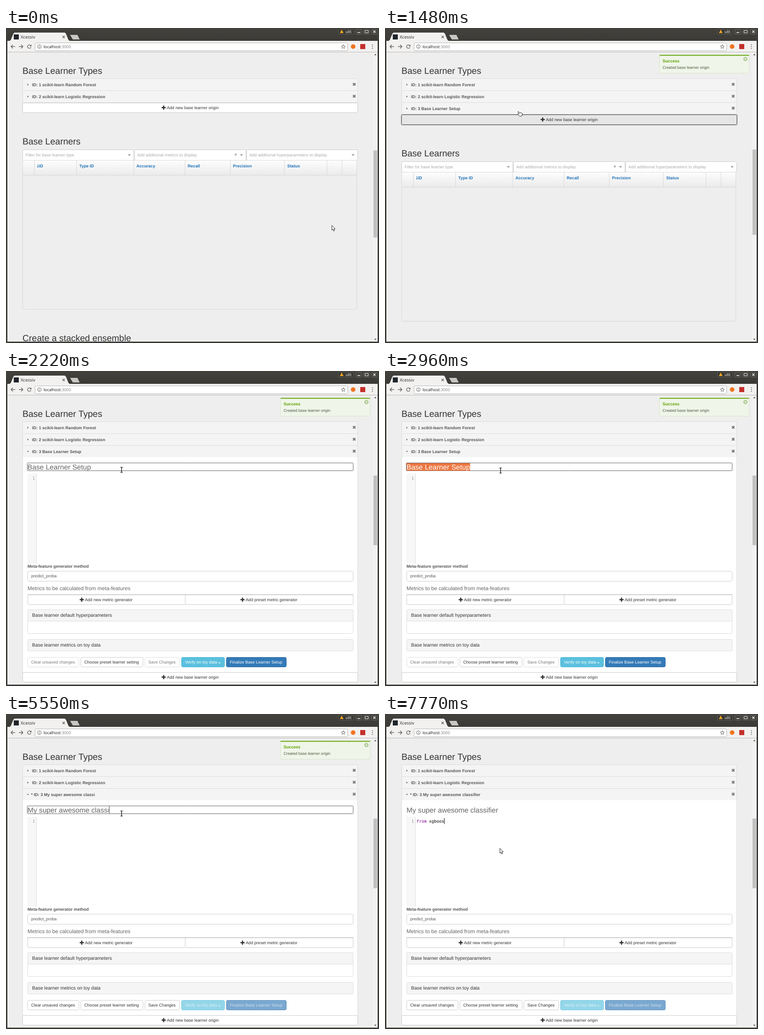
An HTML page with a canvas that plays this animation: 815x687 px, repeating every 8000 ms.

```html
<!DOCTYPE html>
<html lang="en">
<head>
<meta charset="utf-8">
<title>Base learner setup</title>
<style>
  html, body { margin: 0; height: 100%; overflow: hidden; background: #eee; }
  canvas { display: block; width: 815px; height: 687px; }
</style>
</head>
<body>
<canvas id="stage" width="815" height="687"></canvas>
<script>
const ctx = document.getElementById('stage').getContext('2d');
ctx.textRendering = 'geometricPrecision';
const LOOP = 8000, STEP = 370;
const SANS = '"Liberation Sans", sans-serif';
const UI = '"Noto Sans", sans-serif';
const MONO = '"DejaVu Sans Mono", monospace';

// Typed text by step number; a value holds until the next entry.
const titles = { 0: 'Base Learner Setup', 9: 'My', 10: 'My su', 11: 'My super', 12: 'My super awe',
  13: 'My super awesome', 14: 'My super awesome cl', 15: 'My super awesome classi', 16: 'My super awesome classifier' };
const codes = { 0: '', 18: 'f', 19: 'from x', 20: 'from xg', 21: 'from xgboos' };
const cursors = { 0: ['arrow', 712, 430.5], 1: ['hand', 294, 170], 3: ['hand', 294, 206], 4: ['hand', 294, 182],
  5: ['arrow', 269.5, 194.5], 6: ['beam', 252.5, 209.5], 7: ['beam', 252.5, 211], 17: ['arrow', 251, 293] };
const thumbs = { 0: [267, 457], 3: [265, 451], 5: [230.5, 385], 6: [228, 380] };

function at(keys, step) {
  return keys[Math.max(...Object.keys(keys).map(Number).filter(k => k <= step))];
}

function fill(x, y, w, h, color) {
  ctx.fillStyle = color;
  ctx.fillRect(x, y, w, h);
}

function box(x, y, right, bottom, color, border, radius = 0) {
  ctx.beginPath();
  ctx.roundRect(x + .5, y + .5, right - x - 1, bottom - y - 1, radius);
  if (color) { ctx.fillStyle = color; ctx.fill(); }
  if (border) { ctx.strokeStyle = border; ctx.lineWidth = 1; ctx.stroke(); }
}

// The imperceptible skew turns off glyph hinting, so small text keeps its true shape.
function text(str, x, y, size = 9.1, color = '#333', weight = '', family = SANS) {
  ctx.save();
  ctx.transform(1, .0002, .0002, 1, x, y);
  ctx.font = `${weight} ${size}px ${family}`;
  ctx.fillStyle = color;
  ctx.fillText(str, 0, 0);
  const { width } = ctx.measureText(str);
  ctx.restore();
  return width;
}

function shape(points, color, border, width = 1) {
  ctx.beginPath();
  points.forEach(([x, y]) => ctx.lineTo(x, y));
  ctx.closePath();
  if (color) { ctx.fillStyle = color; ctx.fill(); }
  if (border) { ctx.strokeStyle = border; ctx.lineWidth = width; ctx.stroke(); }
}

function line(points, color, width = 1) {
  ctx.beginPath();
  points.forEach(([x, y]) => ctx.lineTo(x, y));
  ctx.strokeStyle = color;
  ctx.lineWidth = width;
  ctx.stroke();
}

function disc(x, y, r, color, border) {
  ctx.beginPath();
  ctx.arc(x, y, r, 0, 7);
  if (color) { ctx.fillStyle = color; ctx.fill(); }
  if (border) { ctx.strokeStyle = border; ctx.lineWidth = 1; ctx.stroke(); }
}

function cross(x, y, r, color, width) {
  line([[x - r, y - r], [x + r, y + r]], color, width);
  line([[x + r, y - r], [x - r, y + r]], color, width);
}

function triangle(x, y, r, direction, color) {
  const turned = { right: [[-.5, -1], [.6, 0], [-.5, 1]], down: [[-1, -.5], [1, -.5], [0, .6]], up: [[-1, .5], [1, .5], [0, -.6]] };
  shape(turned[direction].map(([dx, dy]) => [x + dx * r, y + dy * r]), color);
}

function plusText(str, x, middle) {
  fill(x, middle - 1.3, 9, 2.6, '#333');
  fill(x + 3.2, middle - 4.5, 2.6, 9, '#333');
  text(str, x + 11.5, middle + 3.3);
}

function drawWindow() {
  fill(0, 0, 815, 687, '#3c3b37');
  const bar = ctx.createLinearGradient(0, 0, 0, 28);
  bar.addColorStop(0, '#43423d');
  bar.addColorStop(1, '#3b3a36');
  fill(1, 1, 813, 27, bar);
  fill(3, 28, 809, 25, '#f2f1f0');
  shape([[8, 28], [10.5, 26], [16, 12.5], [18.5, 10], [128.5, 10], [131, 12.5], [136.5, 26], [139, 28]], '#f2f1f0');
  shape([[140, 15], [156, 15], [161, 25], [146, 25]], '#c8c7c4');
  fill(17, 14, 11, 11, '#20252b');
  text('Xcessiv', 32, 23, 9.5, '#333', '', UI);
  cross(126, 19.5, 2.5, '#555', 1.1);

  box(726, 2, 760, 14, '#3a3935', '#5c5b56', 2);
  shape([[733.5, 3.5], [737.5, 11], [729.5, 11]], '#f5a623');
  text('ulit', 742, 11, 8.6, '#eee', '', UI);
  [764, 781, 798].forEach(x => box(x, 2, x + 14, 14, '#45443f', '#66655f', 2));
  fill(768, 9, 6, 1.5, '#eee');
  box(784, 5, 792, 11, null, '#eee');
  cross(805, 8, 2.4, '#eee', 1.4);

  const icon = '#5a5a5a';
  line([[20, 40.5], [11, 40.5]], icon, 1.3);
  line([[15, 36.5], [11, 40.5], [15, 44.5]], icon, 1.3);
  line([[28, 40.5], [37, 40.5]], icon, 1.3);
  line([[33, 36.5], [37, 40.5], [33, 44.5]], icon, 1.3);
  ctx.beginPath();
  ctx.arc(51, 40.5, 3.8, .4, 5.4);
  ctx.strokeStyle = icon;
  ctx.lineWidth = 1.3;
  ctx.stroke();
  shape([[55.5, 36], [55.5, 40], [51.5, 40]], icon);
  box(63, 32, 747, 50, '#fff', '#b8b7b5', 2);
  disc(73, 40.5, 4, null, '#666');
  fill(72.5, 40, 1, 3, '#666');
  fill(72.5, 38, 1, 1, '#666');
  const host = text('localhost', 82, 43.7, 8.85, '#222', '', UI);
  text(':3000', 82 + host, 43.7, 8.85, '#888', '', UI);
  const star = [...Array(10).keys()].map(i => {
    const r = i % 2 ? 2 : 4.6, a = i * Math.PI / 5;
    return [737 + r * Math.sin(a), 40.8 - r * Math.cos(a)];
  });
  shape(star, null, '#666');
  disc(758.5, 40.5, 5, '#f07420');
  fill(774, 35, 11, 11, '#c4302b');
  [36.5, 40.5, 44.5].forEach(y => disc(800.5, y, 1, '#555'));
  fill(3, 52, 809, 1, '#b9b8b6');
  fill(3, 53, 809, 631, '#eee');
}

function drawScrollbar([top, bottom]) {
  fill(802, 53, 10, 631, '#f1f1f1');
  fill(803, top, 8, bottom - top, '#c1c1c1');
  triangle(807, 58, 2.6, 'up', '#505050');
  triangle(807, 679, 2.6, 'down', '#505050');
}

function drawRow(y, label, open, labelX = 57) {
  box(36, y, 769, y + 27, '#f4f4f4', '#ddd');
  triangle(48, y + 13.5, 2.2, open ? 'down' : 'right', '#555');
  text(label, labelX, y + 16.8, 9.1, '#555', 'bold');
  cross(760.8, y + 12.8, 2.7, '#777', 2.3);
}

function drawAddButton(y, background = '#fff', border = '#ccc', focused = false) {
  box(36, y, 769, y + 22, background, border, 2);
  if (focused) box(35, y - 1, 770, y + 23, null, '#777', 2);
  plusText('Add new base learner origin', 340, y + 10.6);
}

function drawLearners(dy) {
  ctx.save();
  ctx.translate(0, dy);
  text('Base Learners', 36, 253.8, 19.5);
  [[36, 280, 'Filter for base learner type'],
   [280, 525, 'Add additional metrics to display'],
   [525, 769, 'Add additional hyperparameters to display']].forEach(([x, right, label]) => {
    box(x, 265, right, 289, '#fff', '#ccc', 3);
    text(label, x + 6.7, 279.8, 9.1, '#aaa');
    triangle(right - 10.5, 277, 3.3, 'down', '#999');
  });
  cross(502, 276, 2, '#999', 1.1);

  const head = ctx.createLinearGradient(0, 289, 0, 321);
  head.addColorStop(0, '#fdfdfd');
  head.addColorStop(1, '#ebebeb');
  fill(36, 289, 730, 32, head);
  box(36, 288, 767, 614, null, '#d8d8d8');
  fill(36, 320.5, 730, 1, '#d8d8d8');
  [62, 154, 279, 391, 490, 608, 701, 734].forEach(x => fill(x - .3, 289, 1, 32, '#d8d8d8'));
  const blue = '#1f72b8';
  line([[69.8, 297], [69.8, 304]], blue);
  line([[68.2, 302.2], [69.8, 304.2], [71.4, 302.2]], blue);
  [['ID', 72], ['Type ID', 160], ['Accuracy', 285], ['Recall', 397], ['Precision', 496], ['Status', 614.5]]
    .forEach(([label, x]) => text(label, x, 303.8, 9.1, blue, 'bold'));
  text('Create a stacked ensemble', 36, 682.8, 19.5);
  ctx.restore();
}

function drawTitle(title, step) {
  const focused = step >= 6 && step <= 16;
  const selected = step === 8;
  if (focused) box(46, 200, 759, 218, null, '#666', 1);
  if (selected) fill(47, 201, 139, 16.5, '#ec7640');
  const width = text(title, 47, 214.7, 15.6, selected ? '#fff' : '#666');
  if (focused && step > 8) fill(Math.round(47 + width) - .3, 201, 1, 16.5, '#555');
}

function drawCode(code, step) {
  fill(47, 224, 19, 196, '#f7f7f7');
  fill(66, 224, 1, 196, '#ddd');
  text('1', 57.8, 236.8, 9.1, '#999', '', MONO);
  const keyword = code.startsWith('from') ? 'from' : '';
  const offset = text(keyword, 69, 236.8, 9.1, '#708', '', MONO);
  const rest = text(code.slice(keyword.length), 69 + offset, 236.8, 9.1, '#000', '', MONO);
  if (step >= 17) fill(69 + offset + rest, 227, 1, 13, '#000');
}

function drawActions(edited) {
  const buttons = [
    [47, 160, 'Clear unsaved changes', '#fff', '#ccc', '#333', edited],
    [163, 300, 'Choose preset learner setting', '#fff', '#ccc', '#333', true],
    [303, 380, 'Save Changes', '#fff', '#ccc', '#333', edited],
    [383, 478, 'Verify on toy data', '#5bc0de', '#46b8da', '#fff', !edited],
    [481, 613, 'Finalize Base Learner Setup', '#337ab7', '#2e6da4', '#fff', !edited]];
  for (const [x, right, label, color, border, ink, enabled] of buttons) {
    ctx.globalAlpha = enabled ? 1 : .65;
    box(x, 624, right, 646, color, border, 3);
    const width = text(label, x + 8, 638.2, 9.1, ink);
    if (label.startsWith('Verify')) triangle(x + 13 + width, 636, 2.4, 'up', ink);
  }
  ctx.globalAlpha = 1;
}

function drawSetup(step) {
  const title = at(titles, step);
  const bottom = step === 5 ? 614 : 658;
  box(36, 188, 769, bottom, '#fff', '#ddd');
  drawRow(162, `${step > 8 ? '* ' : ''}ID: 3 ${title}`, true, step > 8 ? 54.7 : 57);
  fill(37, 188, 731, 1, '#fff');
  drawTitle(title, step);
  drawCode(at(codes, step), step);

  text('Meta-feature generator method', 47, 429.3, 9.1, '#555', 'bold');
  box(47, 436, 759, 459, '#fff', '#ccc', 3);
  text('predict_proba', 55, 450.3, 9.1, '#555');
  text('Metrics to be calculated from meta-features', 47, 477.5, 11.7, '#666');
  box(47, 487, 392, 510, '#fff', '#ccc', 2);
  box(391, 487, 759, 510, '#fff', '#ccc', 2);
  fill(47, 487, 712, 1.6, '#c4c4c4');
  plusText('Add new metric generator', 161, 498.7);
  plusText('Add preset metric generator', 512.3, 498.7);

  box(47, 520, 759, 573, '#fff', '#ddd', 3);
  box(47, 520, 759, 546, '#f5f5f5', '#ddd', 2);
  text('Base learner default hyperparameters', 57, 536.2, 10.4);
  box(47, 585, 759, 611, '#f5f5f5', '#ddd', 2);
  text('Base learner metrics on toy data', 57, 601.2, 10.4);
  if (step > 5) drawActions(step > 8);
  drawAddButton(bottom - 1);
}

function drawAlert(leaving) {
  ctx.save();
  ctx.beginPath();
  ctx.rect(3, 53, 809, 631);
  ctx.clip();
  if (leaving) {
    ctx.globalAlpha = .5;
    ctx.translate(0, -20);
  }
  box(599, 58, 796, 99, '#f0f5ea', '#d9e4cb', 2);
  fill(600, 58.7, 195.5, 1.8, '#5ea400');
  text('Success', 606.5, 74.8, 9.1, '#5ea400', 'bold');
  text('Created base learner origin', 606.5, 88.6, 8.45, '#4b583a');
  disc(787.5, 67.8, 4.6, '#b0ca92');
  cross(787.5, 67.8, 1.7, '#f0f5ea', 1.3);
  ctx.restore();
}

function drawCursor([kind, x, y]) {
  ctx.save();
  ctx.translate(x, y);
  if (kind === 'arrow') {
    shape([[0, 0], [0, 10.5], [2.4, 8.4], [4.1, 12.3], [5.9, 11.5], [4.2, 7.8], [7.3, 7.6]], '#fff', '#222');
  } else if (kind === 'hand') {
    shape([[-4, 1], [-2.5, .4], [0, 2.6], [4.5, 3.2], [6, 5], [5.5, 9.5], [.5, 10.5], [-2, 8.5], [-4.5, 6], [-3.5, 5.2], [-1, 5.6], [-1.5, 4]], '#fff', '#222');
  } else {
    line([[-2.5, .5], [2.5, .5]], '#222', 1.3);
    line([[0, .5], [0, 11.5]], '#222', 1.5);
    line([[-2.5, 11.5], [2.5, 11.5]], '#222', 1.3);
  }
  ctx.restore();
}

function drawPage(step) {
  ctx.save();
  ctx.beginPath();
  ctx.rect(3, 53, 809, 631);
  ctx.clip();
  text('Base Learner Types', 36, 99.8, 19.5);
  drawRow(110, 'ID: 1 scikit-learn Random Forest');
  drawRow(136, 'ID: 2 scikit-learn Logistic Regression');
  if (step < 3) {
    const background = ['#fff', '#e6e6e6', '#d4d4d4'][step];
    drawAddButton(163, background, step ? '#adadad' : '#ccc', step === 2);
    drawLearners(0);
  } else if (step < 5) {
    drawRow(162, 'ID: 3 Base Learner Setup');
    drawAddButton(189, step === 3 ? '#d4d4d4' : '#e6e6e6', '#8c8c8c', true);
    drawLearners(26);
  } else {
    drawSetup(step);
  }
  drawScrollbar(at(thumbs, step));
  ctx.restore();
}

function render(now) {
  const step = Math.floor(now % LOOP / STEP);
  drawWindow();
  drawPage(step);
  if (step >= 3 && step <= 16) drawAlert(step === 16);
  drawCursor(at(cursors, step));
  requestAnimationFrame(render);
}
requestAnimationFrame(render);
</script>
</body>
</html>
```
